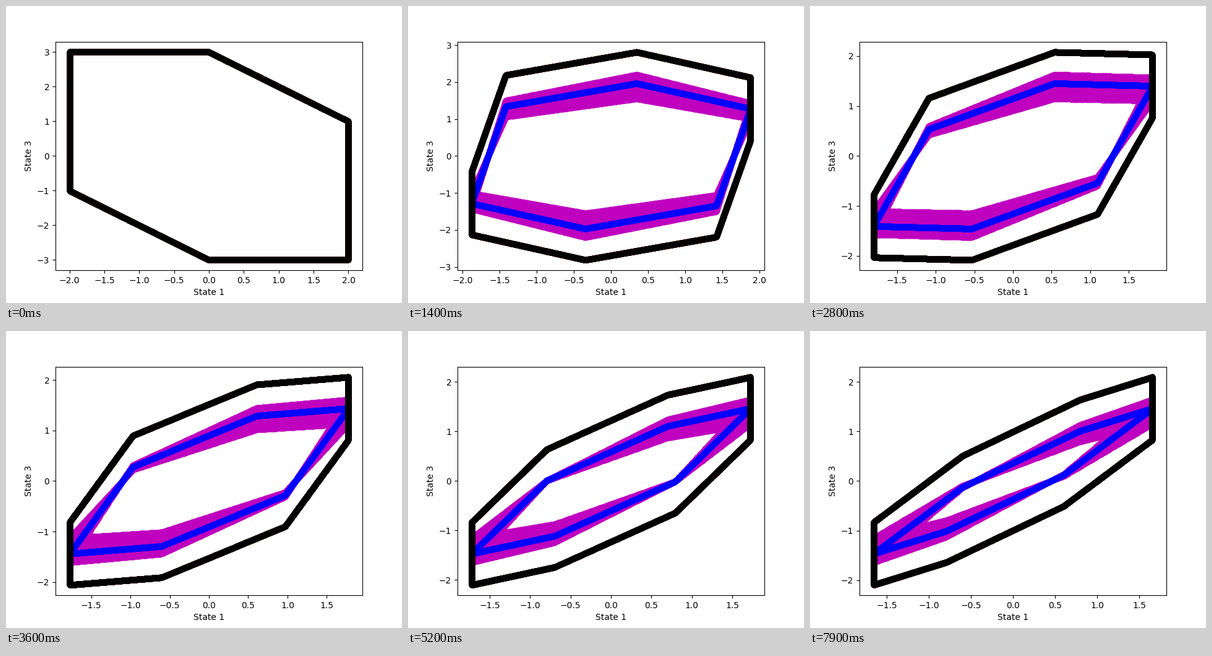
These frames come from a looping animation (640x480 px, 8 s). A matplotlib script:

```python
import numpy as np
import matplotlib.pyplot as plt
from matplotlib.animation import FuncAnimation

STEPS = 80
INTERVAL = 100
ERROR = 0.43                              # relative bound on state 3
GAINS = np.linspace(0.787, 1.12, 12)      # sampled models


def reach_half(n):
    """Three corners of the nominal set; the others mirror them."""
    mix = 1 - np.exp(-n / 20)             # fast coupling of the two states

    def drift(rate):
        return np.exp(n / rate)

    # Responses to a unit start in state 1 (p) and in state 3 (q).
    p = np.array([(1 - 0.182 * mix) * drift(-480), 0.629 * mix * drift(-900)])
    q = np.array([0.221 * mix * drift(400), 1 - mix + 0.313 * mix * drift(2600)])
    return np.array([3 * q - 2 * p, 3 * q, 2 * p + q])


def widen(half, extra):
    """Add a vertical generator to the polygon."""
    up = np.array([0, extra])
    return np.vstack([half + up, half[-1] - up])


def outline(half, count):
    """Dense points along the closed, point-symmetric polygon."""
    ring = np.vstack([half, -half, half[:1]])
    k = np.arange(len(ring))
    t = np.linspace(0, k[-1], k[-1] * count + 1)
    return np.column_stack([np.interp(t, k, side) for side in ring.T])


fig, ax = plt.subplots(figsize=(6.4, 4.8), dpi=100)
ax.set_xlabel("State 1")
ax.set_ylabel("State 3")
samples, nominal, back, bound = (
    ax.plot([], [], color + "o")[0] for color in "mbrk")


def update(n):
    half = reach_half(n)
    for line in (samples, nominal):
        line.set_visible(n > 0)
    if n > 0:
        family = [outline(half * [1, gain], 150) for gain in GAINS]
        samples.set_data(*np.vstack(family).T)
        nominal.set_data(*outline(half, 400).T)
        half = widen(half, ERROR * half[:, 1].max())
    edge = outline(half, 400)
    back.set_data(*edge.T)
    bound.set_data(*edge.T)
    xmax, ymax = 1.1 * np.abs(half).max(axis=0)
    ax.set_xlim(-xmax, xmax)
    ax.set_ylim(-ymax, ymax)
    return samples, nominal, back, bound


anim = FuncAnimation(fig, update, frames=STEPS, interval=INTERVAL,
                     init_func=lambda: update(0), repeat=True,
                     repeat_delay=0, blit=False)
plt.show()
```
